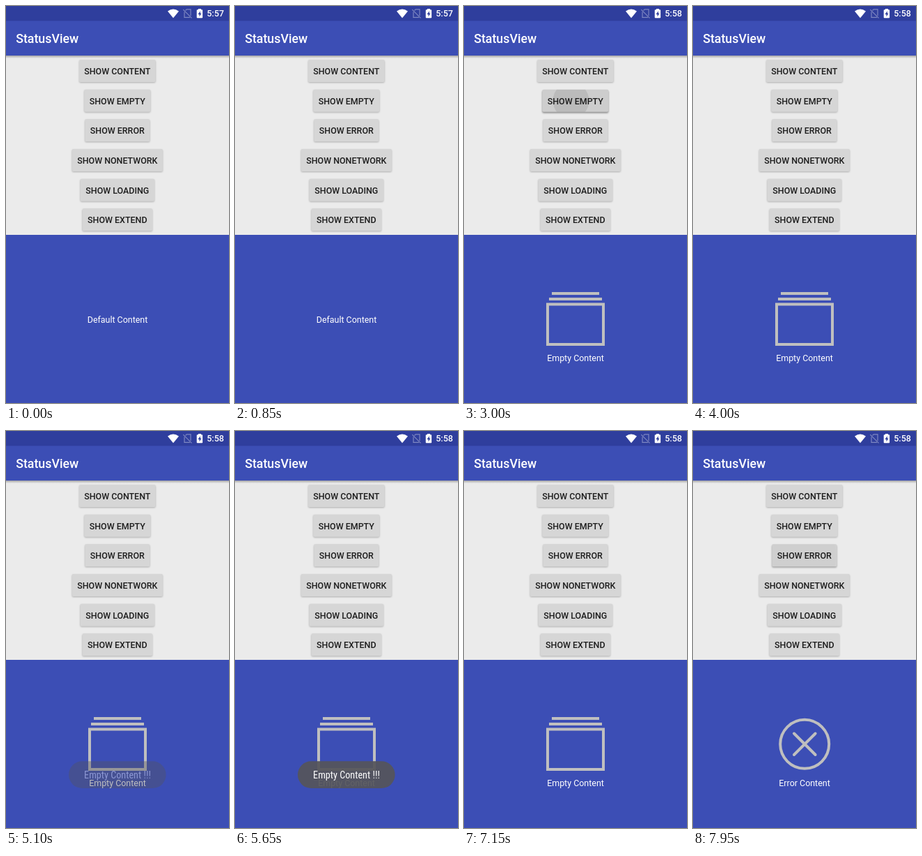
An HTML page for the animation above (8 s loop, 320 by 569 pixels).

```html
<!DOCTYPE html>
<html lang="en">
<head>
<meta charset="utf-8">
<title>StatusView</title>
<style>
  html, body { margin: 0; width: 100%; height: 100%; overflow: hidden; background: #3c4eb5; }
  svg { display: block; width: 100vw; height: 100vh; }
  text { font: 400 12.44px Roboto, sans-serif; fill: #fff; }
  .mid { text-anchor: middle; }
  .medium { font-weight: 500; }
  .title { font-size: 17.78px; }
  .label { fill: #1d1d1d; }
  .line { fill: none; stroke: #bfbfbf; stroke-width: 4; }
  #toast text { font: 400 14.2px "Roboto Condensed", Roboto, sans-serif; font-stretch: condensed; }
</style>
</head>
<body>
<svg viewBox="0 0 320 569" preserveAspectRatio="none">
  <defs>
    <linearGradient id="barShadow" x2="0" y2="1">
      <stop stop-color="#000" stop-opacity=".3"/>
      <stop offset="1" stop-color="#000" stop-opacity="0"/>
    </linearGradient>
    <filter id="soft" x="-10%" y="-30%" width="120%" height="160%"><feGaussianBlur stdDeviation="1"/></filter>
  </defs>

  <rect width="320" height="569" fill="#3c4eb5"/>
  <rect width="320" height="21.3" fill="#2f3e9d"/>
  <rect y="71" width="320" height="257" fill="#ebebeb"/>
  <rect y="71" width="320" height="4" fill="url(#barShadow)"/>
  <text class="medium title" x="14.2" y="53.3">StatusView</text>

  <g fill="#fff">
    <path d="M232 7.6Q240 1.6 248 7.6L240 17.3Z"/>
    <path d="M275.9 5.2V4h4v1.2h1.2q1 0 1 1v10q0 1-1 1h-6.4q-1 0-1-1v-10q0-1 1-1Z"/>
    <path d="M278.7 7.2l-3.2 4.8h2v3.2l3-4.8h-1.8Z" fill="#2f3e9d"/>
  </g>
  <g fill="none" stroke="#fff" stroke-opacity=".38" stroke-width="1.2">
    <path d="M257.5 6.5L259.2 4.8H265V14M256 8.4V16.4H264"/>
    <path d="M254.3 5.2L266.5 17.4"/>
  </g>
  <text id="clock" class="medium" x="288.3" y="15.4"></text>

  <g id="buttons"></g>

  <g id="content"><text class="mid" x="160" y="453.6">Default Content</text></g>
  <g id="empty">
    <path class="line" d="M126 412H194M122 420H198M120 427.5H200V485H120Z"/>
    <text class="mid" x="160" y="508.6">Empty Content</text>
  </g>
  <g id="error">
    <circle class="line" cx="160.2" cy="448.8" r="35"/>
    <path class="line" stroke-linecap="round" d="M145 433.5L175.6 464M175.6 433.5L145 464"/>
    <text class="mid" x="160" y="508.6">Error Content</text>
  </g>

  <g id="toast">
    <rect x="90" y="473.3" width="139.6" height="38.8" rx="19.4" fill="#56555b" fill-opacity=".93"/>
    <text class="mid" x="160" y="498">Empty Content !!!</text>
  </g>
</svg>
<script>
const LOOP = 8000, STEP = 50;
const $ = id => document.getElementById(id);
const clamp = v => Math.min(1, Math.max(0, v));
const span = (t, from, to) => clamp((t - from) / (to - from));

function make(tag, attrs, parent) {
  const el = document.createElementNS('http://www.w3.org/2000/svg', tag);
  for (const key in attrs) el.setAttribute(key, attrs[key]);
  return parent.appendChild(el);
}

// Label and width of each button, top to bottom
const buttons = [
  ['SHOW CONTENT', 109.4], ['SHOW EMPTY', 95], ['SHOW ERROR', 93],
  ['SHOW NONETWORK', 130], ['SHOW LOADING', 106.4], ['SHOW EXTEND', 100.4]
].map(([label, width], i) => {
  const g = make('g', {}, $('buttons'));
  const box = { x: 159.8 - width / 2, y: 77 + i * 42.67, width, height: 32, rx: 1.8 };
  const clip = make('clipPath', { id: 'clip' + i }, g);
  make('rect', box, clip);
  const shadow = make('rect', { ...box, y: box.y + 1, filter: 'url(#soft)' }, g);
  make('rect', { ...box, fill: '#d6d6d6' }, g);
  const tint = make('rect', box, g);
  const circle = make('circle', { cx: 153.5, cy: box.y + 16, 'clip-path': `url(#clip${i})` }, g);
  make('text', { class: 'mid medium label', x: 159.8, y: box.y + 20.9 }, g).textContent = label;
  return { shadow, tint, circle, y: box.y };
});

// Taps: button index, start and length of its ripple
const taps = [[0, 1850, 350], [1, 2800, 500], [2, 7550, 500]];

function press(button, p) {
  const active = p > 0 && p < 1;
  const hold = active ? span(p, 0, .2) * (1 - span(p, .6, 1)) : 0;
  const ink = active ? span(p, 0, .2) * (1 - span(p, .45, .85)) : 0;
  button.tint.setAttribute('fill-opacity', .045 * hold);
  button.circle.setAttribute('fill-opacity', .085 * ink);
  button.circle.setAttribute('r', 65 * p);
  button.shadow.setAttribute('y', button.y + 1 + .8 * hold);
  button.shadow.setAttribute('fill-opacity', .26 + .14 * hold);
}

function toastAlpha(t) {
  const fadeIn = 1 - (1 - span(t, 5000, 5430)) ** 2;
  const fadeOut = span(t, 6770, 7120) ** 2;
  return fadeIn * (1 - fadeOut);
}

function render(time) {
  const t = Math.floor(time % LOOP / STEP) * STEP;
  $('clock').textContent = t < 1550 ? '5:57' : '5:58';
  buttons.forEach(b => press(b, 0));
  for (const [i, start, length] of taps) press(buttons[i], span(t, start, start + length));
  const page = t < 2950 ? 'content' : t < 7700 ? 'empty' : 'error';
  for (const id of ['content', 'empty', 'error']) $(id).style.display = id === page ? '' : 'none';
  $('toast').style.opacity = toastAlpha(t);
}

// Keep the message inside its bubble if no condensed face is installed
const message = document.querySelector('#toast text');
const messageWidth = message.getComputedTextLength();
if (messageWidth > 101) message.style.fontSize = '12.44px';

const start = performance.now();
function tick() {
  render(performance.now() - start);
  requestAnimationFrame(tick);
}
tick();
</script>
</body>
</html>
```
